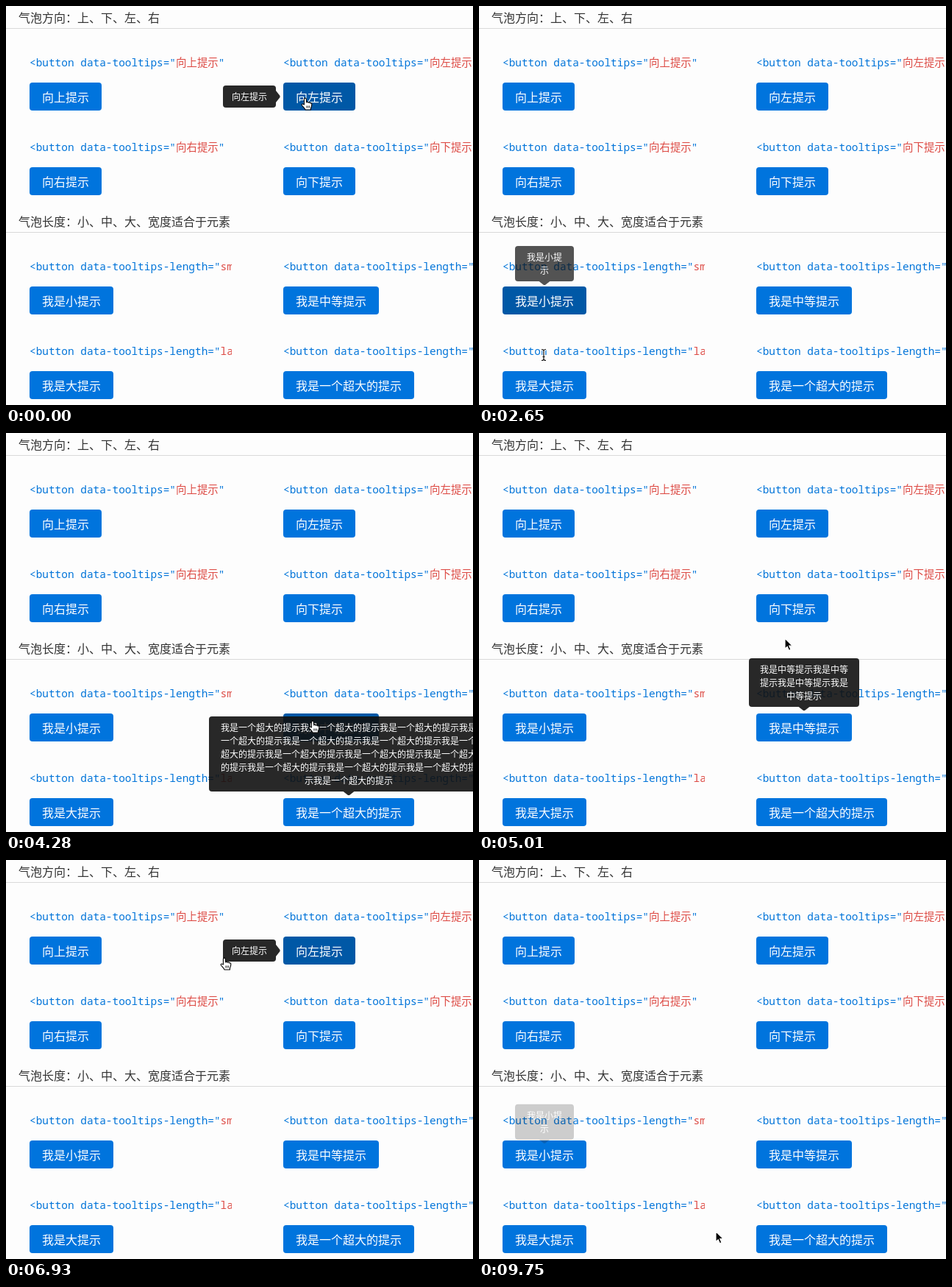
Write an HTML page that moves like this. It is 635 by 542 pixels and loops after 9850 ms.

```html
<!DOCTYPE html>
<html lang="zh-CN">
<head>
<meta charset="utf-8">
<title>气泡提示</title>
<style>
html, body { margin: 0; width: 100%; height: 100%; overflow: hidden; background: #fdfdfd; }
#stage {
  position: relative; width: 635px; height: 542px; overflow: hidden;
  font-family: "Noto Sans CJK SC", "Noto Sans CJK", sans-serif;
}
h2 {
  position: absolute; left: 0; width: 618px; height: 30px; margin: 0; padding-left: 17px;
  font-size: 16px; font-weight: 500; line-height: 30px; color: #333;
  border-bottom: 1px solid #d9d9d9;
}
code {
  position: absolute; width: 275px; height: 20px; overflow: hidden; white-space: nowrap;
  font: 500 14.43px/20px "Noto Sans Mono", "Noto Sans CJK SC", "Noto Sans CJK", monospace;
  color: #0074d9;
}
code b { font-weight: inherit; color: #dd4b45; }
.btn {
  position: absolute; height: 38px; padding: 0 17px; border-radius: 4px;
  font-size: 16px; line-height: 38px; white-space: nowrap; color: #fff; background: #0074dd;
}
.btn.hot { background: #0058a6; }
.tip {
  position: absolute; z-index: 2; box-sizing: border-box; padding: 6px 12px; border-radius: 4px;
  font-size: 12px; line-height: 18px; text-align: center; white-space: normal; word-break: break-all;
  background: rgba(17, 17, 17, .9); opacity: 0;
}
.tip::after { content: ""; position: absolute; background: rgba(17, 17, 17, .9); }
.up { bottom: 47.5px; left: 50%; }
.down { top: 47.5px; left: 50%; }
.left { right: calc(100% + 10px); top: 4px; }
.right { left: calc(100% + 10px); top: 4px; }
.up::after, .down::after { left: calc(50% - 8px); width: 16px; height: 6px; }
.left::after, .right::after { top: 7px; width: 6px; height: 16px; }
.up::after { top: 100%; clip-path: polygon(0 0, 100% 0, 56% 92%, 44% 92%); }
.down::after { bottom: 100%; clip-path: polygon(0 100%, 100% 100%, 56% 8%, 44% 8%); }
.left::after { left: 100%; clip-path: polygon(0 0, 92% 44%, 92% 56%, 0 100%); }
.right::after { right: 100%; clip-path: polygon(100% 0, 8% 44%, 8% 56%, 100% 100%); }
#cursor { position: absolute; left: 0; top: 0; z-index: 3; width: 1px; height: 1px; overflow: visible; }
#cursor g { display: none; }
#cursor g.on { display: inline; }
</style>
</head>
<body>
<div id="stage">
  <h2 style="top:0">气泡方向：上、下、左、右</h2>
  <h2 style="top:277px">气泡长度：小、中、大、宽度适合于元素</h2>
  <svg id="cursor">
    <g id="arrow">
      <path d="M0 0V14.2L3.2 11.2L5.5 16.4L8 15.3L5.8 10.2H10.2Z" fill="#000" stroke="#fff" stroke-width="1.2"/>
    </g>
    <g id="hand">
      <path d="M-1.6 9V1.6C-1.6-.4 1.2-.4 1.2 1.6L1.7 6C2 4.8 4 5 4.2 6.3C5 5.4 6.4 5.8 6.6 7C7.6 6.3 8.8 7 8.8 8.4C8.8 11 8 12.5 7.4 14V16H0C-.5 14.5-2.5 12.5-4.6 10C-5.6 8.6-4 7.4-2.8 8.4Z" fill="#fff" stroke="#000" stroke-width="1.1" stroke-linejoin="round"/>
      <path d="M1.8 10.5V13.5M3.7 10.5V13.5M5.6 10.5V13.5" stroke="#000" stroke-width=".8"/>
    </g>
    <g id="beam" fill="none">
      <path id="bar" d="M-3-7.5Q0-7.5 0-5.5Q0-7.5 3-7.5M0-6V6M-3 7.5Q0 7.5 0 5.5Q0 7.5 3 7.5M-1.5 2.5H1.5" stroke="#fff" stroke-width="3"/>
      <use href="#bar" style="stroke:#000;stroke-width:1.2"/>
      <path d="M-3-7.5Q0-7.5 0-5.5Q0-7.5 3-7.5M0-6V6M-3 7.5Q0 7.5 0 5.5Q0 7.5 3 7.5M-1.5 2.5H1.5" stroke="#111" stroke-width="1.2"/>
    </g>
  </svg>
</div>
<script>
const LOOP = 9850, STEP = 147.5, LAG = 16, SLIDE = 10;
const stage = document.getElementById('stage');
const cursor = document.getElementById('cursor');

// hot: [first, last] steps hovered; tips: [first, opacity, last, opacity]
const cells = [
  { x: 32, y: 104, label: '向上提示', dir: 'up', hot: [[3, 7], [48, 51]], tips: [[4, .6, 9, .3], [49, .5, 53, .3]] },
  { x: 377, y: 104, label: '向左提示', dir: 'left', hot: [[0, 1], [42, 47]], tips: [[0, 1, 2, .4], [43, .7, 48, .5]] },
  { x: 32, y: 219, label: '向右提示', dir: 'right', hot: [[10, 12], [53, 57]], tips: [[11, .7, 15, .3], [54, .7, 58, .88]] },
  { x: 377, y: 219, label: '向下提示', dir: 'down', hot: [[35, 37]], tips: [[36, .7, 40, .3]] },
  { x: 32, y: 381, label: '我是小提示', size: 'small', width: 80, hot: [[15, 18], [58, 63]], tips: [[16, .7, 18, .8], [60, .6, 66, .22]] },
  { x: 377, y: 381, label: '我是中等提示', size: 'medium', width: 150, copies: 4, hot: [[28, 33]], tips: [[31, .5, 35, .2]] },
  { x: 32, y: 496, label: '我是大提示', size: 'large', width: 260, copies: 8, hot: [[19, 21]], tips: [[20, .7, 23, .5]] },
  { x: 377, y: 496, label: '我是一个超大的提示', size: 'xlarge', width: 380, copies: 14, hot: [[23, 27]], tips: [[24, .7, 30, .5]] }
];

// Cursor route: step, x, y, shape
const route = [
  [0, 407, 125, 'hand'], [1, 345, 128, 'hand'], [2, 230, 130, 'arrow'], [3, 125, 128, 'hand'],
  [5, 81, 125, 'hand'], [7, 81, 128, 'hand'], [8, 81, 160, 'arrow'], [9, 80, 190, 'beam'],
  [10, 81, 232, 'hand'], [12, 81, 240, 'hand'], [13, 83, 290, 'arrow'], [14, 86, 350, 'beam'],
  [15, 88, 394, 'hand'], [17, 88, 402, 'hand'], [18, 88, 474, 'beam'], [19, 88, 508, 'hand'],
  [21, 92, 514, 'hand'], [22, 298, 514, 'arrow'], [23, 400, 514, 'hand'], [27, 440, 500, 'hand'],
  [28, 428, 410, 'hand'], [29, 417, 391, 'hand'], [33, 417, 388, 'hand'], [34, 416, 279, 'arrow'],
  [35, 418, 240, 'hand'], [37, 420, 234, 'hand'], [38, 421, 210, 'arrow'], [40, 422, 130, 'hand'],
  [41, 421, 80, 'beam'], [42, 418, 112, 'hand'], [46, 385, 126, 'hand'], [47, 297, 133, 'hand'],
  [48, 120, 126, 'hand'], [50, 81, 124, 'hand'], [51, 81, 126, 'hand'], [52, 82, 190, 'beam'],
  [53, 82, 236, 'hand'], [57, 88, 246, 'hand'], [58, 95.5, 420, 'arrow'], [59, 96, 408, 'hand'],
  [63, 100, 404, 'hand'], [64, 170, 440, 'arrow'], [66, 322, 504.5, 'arrow']
];

function add(parent, tag, cls, html) {
  const el = document.createElement(tag);
  el.className = cls;
  el.innerHTML = html;
  parent.append(el);
  return el;
}

function place(el, x, y) {
  el.style.left = x + 'px';
  el.style.top = y + 'px';
}

for (const c of cells) {
  c.dir = c.dir || 'up';
  const attr = c.size ? 'data-tooltips-length' : 'data-tooltips';
  place(add(stage, 'code', '', `&lt;button ${attr}="<b>${c.size || c.label}</b>"`), c.x, c.y - 37);
  c.btn = add(stage, 'div', 'btn', c.label);
  place(c.btn, c.x, c.y);
  c.tip = add(c.btn, 'div', 'tip ' + c.dir, c.label.repeat(c.copies || 1));
  c.tip.style.width = (c.width || 72) + 'px';
}

const within = (k, a, b) => k >= a && k <= b;

function tipOpacity(spans, k) {
  const span = spans.find(s => within(k, s[0], s[2]));
  if (!span) return 0;
  return k === span[2] ? span[3] : k === span[0] ? span[1] : 1;
}

function slide(dir, o) {
  const d = SLIDE * (1 - o);
  if (dir === 'up') return `translate(-50%, ${d}px)`;
  if (dir === 'down') return `translate(-50%, ${-d}px)`;
  return `translateX(${dir === 'left' ? d : -d}px)`;
}

function moveCursor(k) {
  const i = route.findLastIndex(p => p[0] <= k);
  const a = route[i], b = route[i + 1] || a;
  const f = b === a ? 0 : (k - a[0]) / (b[0] - a[0]);
  const mix = n => a[n] + (b[n] - a[n]) * f;
  cursor.style.transform = `translate(${mix(1)}px, ${mix(2)}px)`;
  for (const g of cursor.querySelectorAll('g')) g.classList.toggle('on', g.id === a[3]);
}

function draw(k) {
  for (const c of cells) {
    const o = tipOpacity(c.tips, k);
    c.btn.classList.toggle('hot', c.hot.some(h => within(k, h[0], h[1])));
    c.tip.style.opacity = o;
    c.tip.style.transform = slide(c.dir, o);
  }
  moveCursor(k);
}

let shown = -1;
const start = performance.now();
function tick(now) {
  const t = Math.max(0, now - start) % LOOP;
  const k = Math.min(66, Math.floor((t + LAG) / STEP));
  if (k !== shown) draw(shown = k);
  requestAnimationFrame(tick);
}
tick(start);
</script>
</body>
</html>
```
